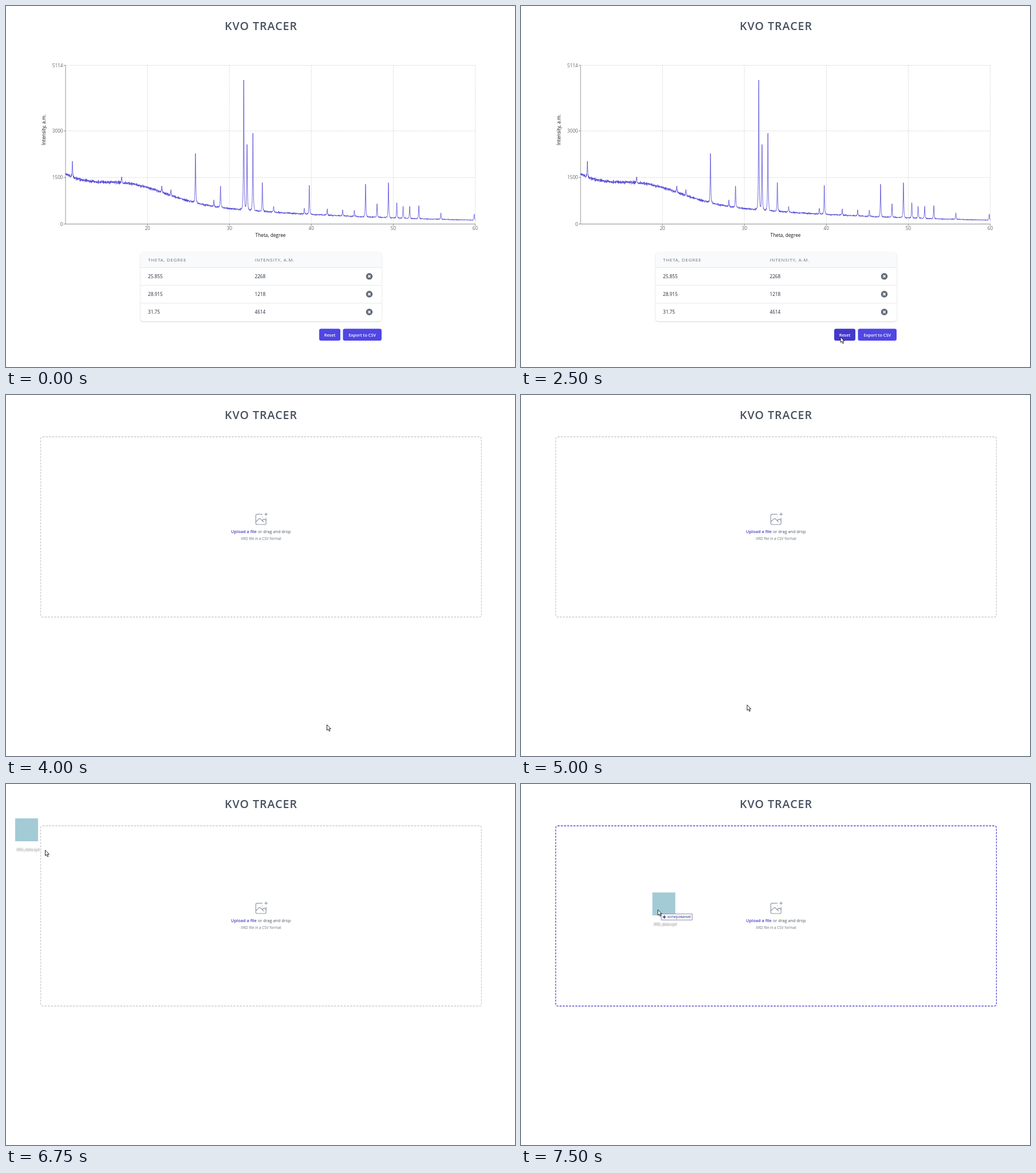
An HTML page with a canvas for the animation above (8 s loop, 889 by 630 pixels).

```html
<!DOCTYPE html>
<html lang="en">
<head>
<meta charset="utf-8">
<title>KVO TRACER</title>
<style>
  html, body { margin: 0; width: 100%; height: 100%; overflow: hidden; background: #fff; }
  canvas { display: block; }
</style>
</head>
<body>
<canvas id="stage" width="889" height="630"></canvas>
<script>
const ctx = document.getElementById('stage').getContext('2d');
const LOOP = 8000, STEP = 250;
const INDIGO = '#4f46e5', GRAY = '#6b7280', NAVY = '#243a94';
const PLOT = { left: 104, right: 819.5, top: 103.5, bottom: 380.5 };

function text(str, x, y, size, color, { weight = 400, align = 'left', spacing = 0 } = {}) {
  ctx.font = `${weight} ${size}px "Open Sans", "Noto Sans", sans-serif`;
  ctx.textAlign = align;
  ctx.letterSpacing = spacing + 'px';
  ctx.fillStyle = color;
  ctx.fillText(str, x, y);
}

function line(x1, y1, x2, y2, color, width = 1) {
  ctx.strokeStyle = color;
  ctx.lineWidth = width;
  ctx.beginPath();
  ctx.moveTo(x1, y1);
  ctx.lineTo(x2, y2);
  ctx.stroke();
}

function box(x, y, w, h, r) {
  ctx.beginPath();
  ctx.roundRect(x, y, w, h, r);
}

function seeded(seed) {
  return () => {
    seed = (seed + 0x6d2b79f5) | 0;
    let t = Math.imul(seed ^ (seed >>> 15), 1 | seed);
    t = (t + Math.imul(t ^ (t >>> 7), 61 | t)) ^ t;
    return ((t ^ (t >>> 14)) >>> 0) / 4294967296;
  };
}

const xOf = theta => PLOT.left + (theta - 10) * (PLOT.right - PLOT.left) / 50;
const yOf = counts => PLOT.bottom - counts * (PLOT.bottom - PLOT.top) / 5114;

// Diffraction pattern: smooth background, counting noise and sharp peaks
const strong = { 10.84: 520, 25.855: 1560, 28.915: 700, 31.75: 4170, 32.15: 2130, 32.87: 2530,
  34.02: 940, 39.75: 930, 46.62: 1040, 48.02: 430, 49.41: 1160, 50.43: 490, 51.2: 400, 52: 395, 53.12: 425 };
const weak = [16.85, 21.74, 22.86, 28.1, 35.4, 39.14, 41.94, 43.82, 45.25, 55.81, 59.88];
const peaks = [...Object.entries(strong).map(([theta, h]) => [+theta, h]), ...weak.map(theta => [theta, 200])];

const background = theta =>
  490 * Math.exp((30 - theta) / 22) +
  440 * Math.exp(-(((theta - 18) / 6.3) ** 2)) +
  320 * Math.exp((10 - theta) / 2.2);

const pattern = (() => {
  const rnd = seeded(17), path = new Path2D();
  for (let theta = 10; theta <= 60.03; theta += 0.015) {
    let counts = background(theta);
    counts += (rnd() + rnd() + rnd() - 1.5) * 1.4 * Math.sqrt(counts);
    for (const [center, h] of peaks) counts += h / (1 + ((theta - center) / 0.055) ** 2) ** 1.5;
    path.lineTo(xOf(theta), yOf(counts));
  }
  return path;
})();

function chart() {
  const { left, right, top, bottom } = PLOT;
  const xTicks = [20, 30, 40, 50, 60], yTicks = [0, 1500, 3000, 5114];

  ctx.setLineDash([1.65, 1.65]);
  for (const v of yTicks) line(left, yOf(v), right, yOf(v), '#c4c4c4', 0.8);
  for (const v of xTicks) line(xOf(v), top, xOf(v), bottom, '#c4c4c4', 0.8);
  ctx.setLineDash([]);

  line(left, bottom, right, bottom, '#777', 0.8);
  line(left, top, left, bottom, '#777', 0.8);
  for (const v of yTicks) {
    line(left - 3.5, yOf(v), left, yOf(v), '#777', 0.8);
    text(v, 99.5, yOf(v) + 3.1, 8.2, '#666', { align: 'right' });
  }
  for (const v of xTicks) {
    line(xOf(v), bottom, xOf(v), bottom + 3.5, '#777', 0.8);
    text(v, xOf(v), 391, 8.2, '#666', { align: 'center' });
  }
  text('Theta, degree', 462, 402.8, 8.3, '#111', { align: 'center' });
  ctx.save();
  ctx.translate(69, 216);
  ctx.rotate(-Math.PI / 2);
  text('Intensity, a.m.', 0, 0, 8.3, '#111', { align: 'center' });
  ctx.restore();

  ctx.strokeStyle = '#5148d6';
  ctx.lineWidth = 0.8;
  ctx.lineJoin = 'round';
  ctx.stroke(pattern);
}

function removeIcon(x, y) {
  ctx.fillStyle = '#646b78';
  ctx.beginPath();
  ctx.arc(x, y, 5.8, 0, Math.PI * 2);
  ctx.fill();
  line(x - 2, y - 2, x + 2, y + 2, '#fff', 1.6);
  line(x - 2, y + 2, x + 2, y - 2, '#fff', 1.6);
}

function table() {
  ctx.save();
  ctx.shadowColor = 'rgba(0,0,0,.2)';
  ctx.shadowBlur = 2.5;
  ctx.shadowOffsetY = 0.8;
  ctx.fillStyle = '#fff';
  box(235, 430, 421, 120, 4.5);
  ctx.fill();
  ctx.restore();

  ctx.fillStyle = '#f8fafc';
  box(235, 430, 421, 26.5, [4.5, 4.5, 0, 0]);
  ctx.fill();
  const head = { weight: 500, spacing: 0.72 };
  text('THETA, DEGREE', 248, 446, 8, GRAY, head);
  text('INTENSITY, A.M.', 434.5, 446, 8, GRAY, head);

  [['25.855', '2268'], ['28.915', '1218'], ['31.75', '4614']].forEach(([theta, counts], i) => {
    const y = 472 + i * 31.1;
    line(235, y - 15.5, 656, y - 15.5, '#e5e7eb', 0.9);
    text(theta, 248, y + 3, 8.2, '#1f2937');
    text(counts, 434.5, y + 3, 8.2, '#1f2937');
    removeIcon(634.5, y - 0.2);
  });
}

function button(label, x, w, color) {
  ctx.fillStyle = color;
  box(x, 563.3, w, 20.7, 3.3);
  ctx.fill();
  text(label, x + w / 2, 576.6, 7.35, '#fff', { weight: 600, align: 'center' });
}

function results(hover, focus) {
  chart();
  table();
  if (focus) {
    ctx.strokeStyle = INDIGO;
    ctx.lineWidth = 1.2;
    box(545.3, 561.6, 40.4, 24.1, 4.6);
    ctx.stroke();
  }
  button('Reset', 547, 37, hover ? '#4338ca' : INDIGO);
  button('Export to CSV', 588.5, 67.5, INDIGO);
}

const imageIcon = new Path2D('M28 8H12a4 4 0 00-4 4v20m32-12v8m0 0v8a4 4 0 01-4 4H12a4 4 0 01-4-4v-4' +
  'm32-4l-3.172-3.172a4 4 0 00-5.656 0L28 28M8 32l9.172-9.172a4 4 0 015.656 0L28 28m0 0l4 4' +
  'm4-24h8m-4-4v8m-12 4h.02');

function dropZone(active) {
  ctx.setLineDash([3.5, 2]);
  ctx.strokeStyle = active ? '#5049d2' : '#c6cad1';
  ctx.lineWidth = 1.3;
  box(60.6, 73, 769.8, 314.5, 3.5);
  ctx.stroke();
  ctx.setLineDash([]);

  ctx.save();
  ctx.translate(431.8, 203.6);
  ctx.scale(0.56, 0.56);
  ctx.strokeStyle = '#8f96a3';
  ctx.lineWidth = 2.1;
  ctx.lineCap = ctx.lineJoin = 'round';
  ctx.stroke(imageIcon);
  ctx.restore();

  text('Upload a file', 393, 241, 7.4, '#473cc4', { weight: 600 });
  text('or drag and drop', 497.5, 241, 7.3, '#4b5563', { align: 'right' });
  text('XRD file in a CSV format', 445.5, 253.3, 6.4, GRAY, { align: 'center' });
}

function draggedFile(x, y, copying) {
  ctx.fillStyle = '#a3cbd5';
  ctx.fillRect(x + 5, y + 1, 40, 40);

  ctx.save();
  ctx.shadowColor = '#444';
  ctx.shadowBlur = 2;
  ctx.shadowOffsetX = ctx.shadowOffsetY = 0.6;
  text('XRD_data.xyd', x + 26.5, y + 57.6, 6.35, '#fff', { align: 'center' });
  ctx.restore();

  if (!copying) return;
  ctx.fillStyle = '#fff';
  ctx.strokeStyle = '#7c7c92';
  ctx.lineWidth = 0.9;
  box(x + 20.5, y + 38.5, 54, 10.5, 0);
  ctx.fill();
  ctx.stroke();
  line(x + 23, y + 43.8, x + 28.6, y + 43.8, NAVY, 1.5);
  line(x + 25.8, y + 41, x + 25.8, y + 46.6, NAVY, 1.5);
  text('копирование', x + 31.2, y + 46, 6.3, NAVY);
}

const arrow = new Path2D('M0 0V9.6L2.2 7.6L3.9 11.3L5.5 10.6L3.9 7H6.8Z');

function cursor(x, y) {
  ctx.save();
  ctx.translate(x + 0.5, y + 0.5);
  ctx.fillStyle = '#fff';
  ctx.fill(arrow);
  ctx.strokeStyle = '#111';
  ctx.lineWidth = 0.9;
  ctx.lineJoin = 'miter';
  ctx.stroke(arrow);
  ctx.restore();
}

const easeSine = p => Math.sin(p * Math.PI / 2);
const easeIn = power => p => p ** power;
const easeOut = power => p => 1 - (1 - p) ** power;

// Point between two places, held at both ends
function glide(t, start, end, [x0, y0], [x1, y1], easeX, easeY = easeX) {
  const p = Math.min(1, Math.max(0, (t - start) / (end - start)));
  return [x0 + (x1 - x0) * easeX(p), y0 + (y1 - y0) * easeY(p)];
}

const reset = [560, 575];

function pointer(t) {
  if (t < 4500) return glide(t, 1500, 2750, [510, 619], reset, easeSine);
  if (t < 6000) return glide(t, 4500, 5750, reset, [15, 377], easeIn(1.3), easeIn(1.9));
  return glide(t, 6750, 7250, [68, 115], [238.5, 219], easeOut(5.2));
}

function draw(t) {
  ctx.fillStyle = '#fff';
  ctx.fillRect(0, 0, 889, 630);
  text('KVO TRACER', 445.5, 41.6, 19.6, '#475060', { weight: 600, align: 'center', spacing: 1 });

  const dragging = t >= 6750, overZone = t >= 7000;
  if (t < 4000) results(t >= 2500, t >= 3750);
  else dropZone(overZone);

  if (dragging) draggedFile(...glide(t, 6750, 7250, [11, 59], [224.5, 188.3], easeOut(3.25)), overZone);
  if (dragging || (t >= 1500 && t < 6000)) cursor(...pointer(t));
}

const start = performance.now();
function tick() {
  const t = (performance.now() - start) % LOOP;
  draw(Math.floor(t / STEP) * STEP);
  requestAnimationFrame(tick);
}
tick();
</script>
</body>
</html>
```
